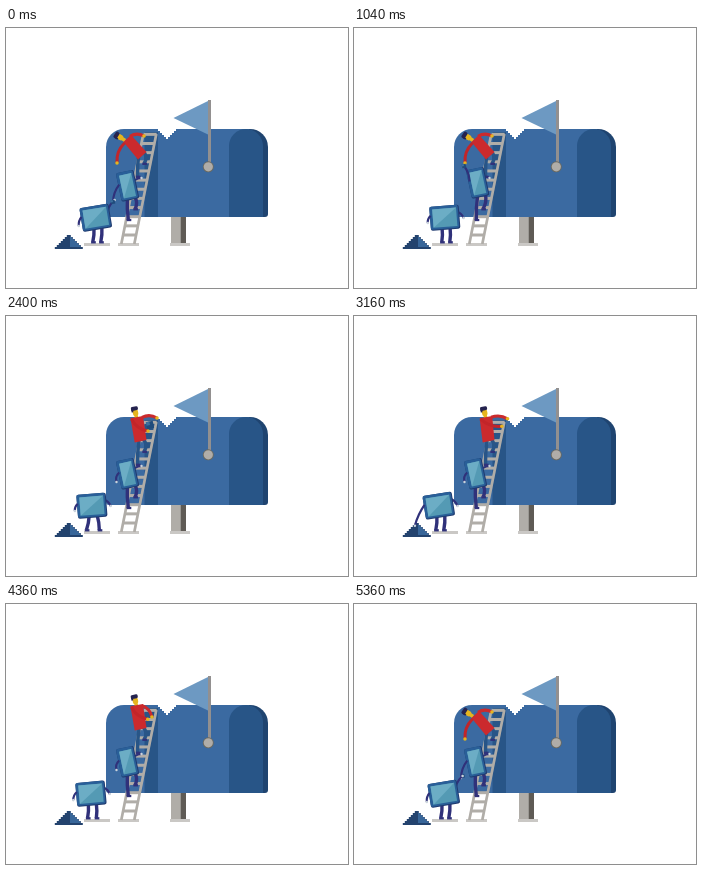
These frames come from a looping animation (342 px wide and 260 px high, 5.44 s). An HTML page with a canvas:

```html
<!DOCTYPE html>
<html lang="en">
<head>
<meta charset="utf-8">
<title>Mailbox crew</title>
<style>
html, body { margin: 0; width: 100%; height: 100%; overflow: hidden; background: #fff; }
canvas { display: block; width: 342px; height: 260px; }
</style>
</head>
<body>
<canvas id="stage" width="342" height="260"></canvas>
<script>
const ctx = document.getElementById('stage').getContext('2d');
const LOOP = 5440, STEP = 40, LAST = 5360;
const NAVY = '#30317a', RED = '#cb2a2d', SKIN = '#e5b51f', HAIR = '#25234f';
const BODY = '#3b6aa1', SHADE = '#285587', METAL = '#b0ada8', FOOTING = '#cac8c5', PALE = '#cbd4dc';

// Motion helpers
function ramp(t, from, to) {
  const k = Math.max(0, Math.min(1, (t - from) / (to - from)));
  return k * k * (3 - 2 * k);
}
const pulse = (t, a, b, c, d) => ramp(t, a, b) - ramp(t, c, d);
const mix = (p, q, k) => p.map((v, i) => v + (q[i] - v) * k);
const add = (p, x, y) => [p[0] + x, p[1] + y];
function place([cx, cy], deg, x, y) {
  const a = deg * Math.PI / 180, c = Math.cos(a), s = Math.sin(a);
  return [cx + x * c - y * s, cy + x * s + y * c];
}

// Drawing helpers
function rect(color, x, y, w, h) {
  ctx.fillStyle = color;
  ctx.fillRect(x, y, w, h);
}
function round(color, x, y, w, h, radii) {
  ctx.beginPath();
  ctx.roundRect(x, y, w, h, radii);
  ctx.fillStyle = color;
  ctx.fill();
}
function poly(color, ...points) {
  ctx.beginPath();
  points.forEach(p => ctx.lineTo(...p));
  ctx.fillStyle = color;
  ctx.fill();
}
function dot(color, [x, y], r) {
  ctx.beginPath();
  ctx.arc(x, y, r, 0, Math.PI * 2);
  ctx.fillStyle = color;
  ctx.fill();
}
function line(color, width, x1, y1, x2, y2) {
  limb(color, width, [x1, y1], [x2, y2], 0);
}
// A curved stroke; bend moves its middle sideways.
function limb(color, width, [x1, y1], [x2, y2], bend) {
  const dx = x2 - x1, dy = y2 - y1, len = Math.hypot(dx, dy) || 1;
  ctx.beginPath();
  ctx.moveTo(x1, y1);
  ctx.quadraticCurveTo((x1 + x2) / 2 - dy / len * bend, (y1 + y2) / 2 + dx / len * bend, x2, y2);
  ctx.strokeStyle = color;
  ctx.lineWidth = width;
  ctx.stroke();
}
function arm(color, width, shoulder, hand, bend, skin) {
  limb(color, width, shoulder, hand, bend);
  dot(skin, hand, width * .58);
}
function leg(color, hip, foot, bend) {
  limb(color, 3.4, hip, foot, bend);
  line(NAVY, 2.3, foot[0] - 1.7, foot[1] + .3, foot[0] + 3, foot[1] + .3);
}
function turned([x, y], deg, draw) {
  ctx.save();
  ctx.translate(x, y);
  ctx.rotate(deg * Math.PI / 180);
  draw();
  ctx.restore();
}

// Scenery
function mailbox() {
  rect(METAL, 165, 187, 9.5, 29);
  rect('#5f5b55', 174.5, 187, 5.5, 29);
  rect(FOOTING, 164, 215, 20, 3);
  round('#1f4470', 200, 101, 62, 88, [0, 18, 3, 0]);
  round(BODY, 100, 101, 143, 88, [18, 0, 0, 3]);
  round(SHADE, 223, 101, 34, 88, [17, 17, 0, 0]);
  rect(SHADE, 138.5, 104, 13.5, 85);
  for (let i = 0; i < 5; i++) rect('#fff', 152 + i * 2, 100 + i * 2, 18 - i * 4, 3);
  poly('#6d99c2', [167.5, 90], [203, 72.5], [203, 107]);
  rect('#929090', 202, 72, 3, 63);
  dot('#6a6960', [202.3, 138.8], 5.5);
  dot(METAL, [202.3, 138.8], 4.6);
}

function ladder() {
  rect(FOOTING, 112, 215, 21, 3);
  for (let i = 0; i < 12; i++) {
    const y = 207 - i * 9.15, x = 137.5 - (y - 107) * .2;
    line(METAL, 3, x, y, x + 13, y);
  }
  for (const x of [137.3, 150.3]) line(METAL, 2.7, x, 106, x - 22, 216);
}

function pile() {
  for (let i = 0; i < 7; i++) {
    const y = 207 + i * 2, half = 2 + i * 2;
    rect('#23436e', 62.8 - half, y, half * 2, 2);
    if (i > 0 && i < 6) rect('#386699', 64, y, half - 2, 2);
  }
}

// Crew: each pose is worked out from a few eased amounts
function lowerPose(t) {
  const away = pulse(t, 1760, 2640, 4300, 4900);
  const give = 1 - pulse(t, 80, 600, 4720, LAST);
  const lean = pulse(t, 2400, 3000, 3900, 4500);
  const dig = pulse(t, 2880, 3200, 3240, 3600);
  const x = 90.8 - 6 * away - give;
  const stride = 4 + 4.5 * Math.sin(Math.PI * away);
  return {
    mid: [x, 189.7],
    tilt: -4.5 - 5 * give - 4.5 * lean,
    left: [x - 17 - 5 * lean - 2 * dig, 195 + 3 * give + 8 * lean + 7 * dig],
    right: [x + 18.8, 190 - 18 * give],
    feet: [x + 1 - stride, x + 1 + stride]
  };
}

function upperPose(t) {
  const lift = pulse(t, 80, 1000, 1720, 2360);
  const take = 1 - pulse(t, 80, 700, 4800, LAST);
  const raise = pulse(t, 200, 1000, 1160, 1680);
  return {
    mid: mix([121.6, 157.8], [123.8, 154.8], lift),
    tilt: -12,
    hand: mix(mix([110.5, 166], [107, 174], take), [110, 138], raise)
  };
}

function workerPose(t) {
  const bend = 1 - pulse(t, 1160, 1640, 4320, 5080);
  const reach = pulse(t, 1720, 2360, 3080, 3560);
  const toss = pulse(t, 2400, 2840, 3000, 3360);
  const between = (up, down) => mix(up, down, bend);
  return {
    bend,
    left: add(between([124.5, 102.2], [117.5, 114]), 2 * toss, 0),
    right: add(between([137, 100], [125, 107]), 2 * toss, 0),
    hip: between([128.7, 126.5], [132, 131.5]),
    head: add(between([129.2, 96.8], [114, 109.5]), 2 * toss, 0),
    tilt: -12 - 45 * bend,
    leftHand: add(between([142, 115], [111, 135]), 10 * toss, -8 * toss),
    rightHand: add(between([146, 113], [138, 108]), 5 * reach + 5 * toss, -11 * reach)
  };
}

function tablet(mid, deg, w, h) {
  turned(mid, deg, () => {
    round('#203b70', -w / 2, -h / 2, w, h, 2);
    round('#295f98', -w / 2, -h / 2, w - 1, h - 1, 2);
    const x = w / 2 - 2.8, y = h / 2 - 2.8;
    rect('#549ab4', -x, -y, x * 2, y * 2);
    poly('#6cadc5', [-x, -y], [x, -y], [-x, y]);
  });
}

function drawLower({ mid, tilt, left, right, feet }) {
  feet.forEach((x, i) => leg(NAVY, place(mid, tilt, i * 8 - 3.5, 10), [x, 214], -1));
  arm(NAVY, 2.2, place(mid, tilt, 13, -5), right, -2, PALE);
  tablet(mid, tilt, 29.5, 24);
  arm(NAVY, 2.2, place(mid, tilt, -14, -3), left, 2, PALE);
}

function drawUpper({ mid, tilt, hand }) {
  leg(NAVY, place(mid, tilt, 5, 13), [129, 181], -3);
  leg(NAVY, place(mid, tilt, -3, 13), [122.3, 191.7], 1);
  arm(NAVY, 2.1, place(mid, tilt, 8, -4), [135.5, 150], -1, PALE);
  tablet(mid, tilt, 18, 29);
  arm(NAVY, 2.1, place(mid, tilt, -8, -3), hand, 3, PALE);
}

function drawWorker(p) {
  leg(SHADE, [133, 125], [131.5, 148.5], 1);
  leg(SHADE, [137, 123], [138, 135.5], -5);
  arm(RED, 3.1, add(p.right, -1, 1.3), p.rightHand, -4, SKIN);
  turned(p.head, p.tilt, () => {
    rect(SKIN, -1.5, 0, 3.5, 6);
    round(SKIN, -2.4, -3.5, 5.4, 6.5, 2);
    round(HAIR, -3.4, -6.3, 7, 4, 1.4);
    rect(HAIR, -3.4, -4, 1.8, 3);
  });
  poly(RED, p.left, p.right, [140.5, 124], p.hip);
  arm('#c22529', 3, add(p.left, 1, 1), p.leftHand, 5, SKIN);
}

function parcel([x, y], size) {
  turned([x, y], -12, () => {
    rect('#204c7c', -size / 2, -size / 2, size, size);
    rect('#3b719f', -size / 2, -size / 2, size / 2, size / 2);
  });
}

function scene(t) {
  const lower = lowerPose(t), upper = upperPose(t), worker = workerPose(t);
  rect('#fff', 0, 0, 342, 260);
  mailbox();
  ladder();
  rect(FOOTING, 78, 215, 26, 3);
  pile();
  if (t > 3200) parcel(mix(lower.left, lower.right, ramp(t, 4200, 4760)), 4);
  drawWorker(worker);
  const up = 1 - worker.bend;
  if (t > 1120 && t < 2880) parcel(add(worker.leftHand, 2 * up, -6 * up), 4 + 3 * up);
  drawUpper(upper);
  drawLower(lower);
  if (t <= 1120) parcel(upper.hand, 4);
}

const start = performance.now();
function frame() {
  const t = (performance.now() - start) % LOOP;
  scene(Math.min(LAST, Math.floor(t / STEP) * STEP));
  requestAnimationFrame(frame);
}
frame();
</script>
</body>
</html>
```
